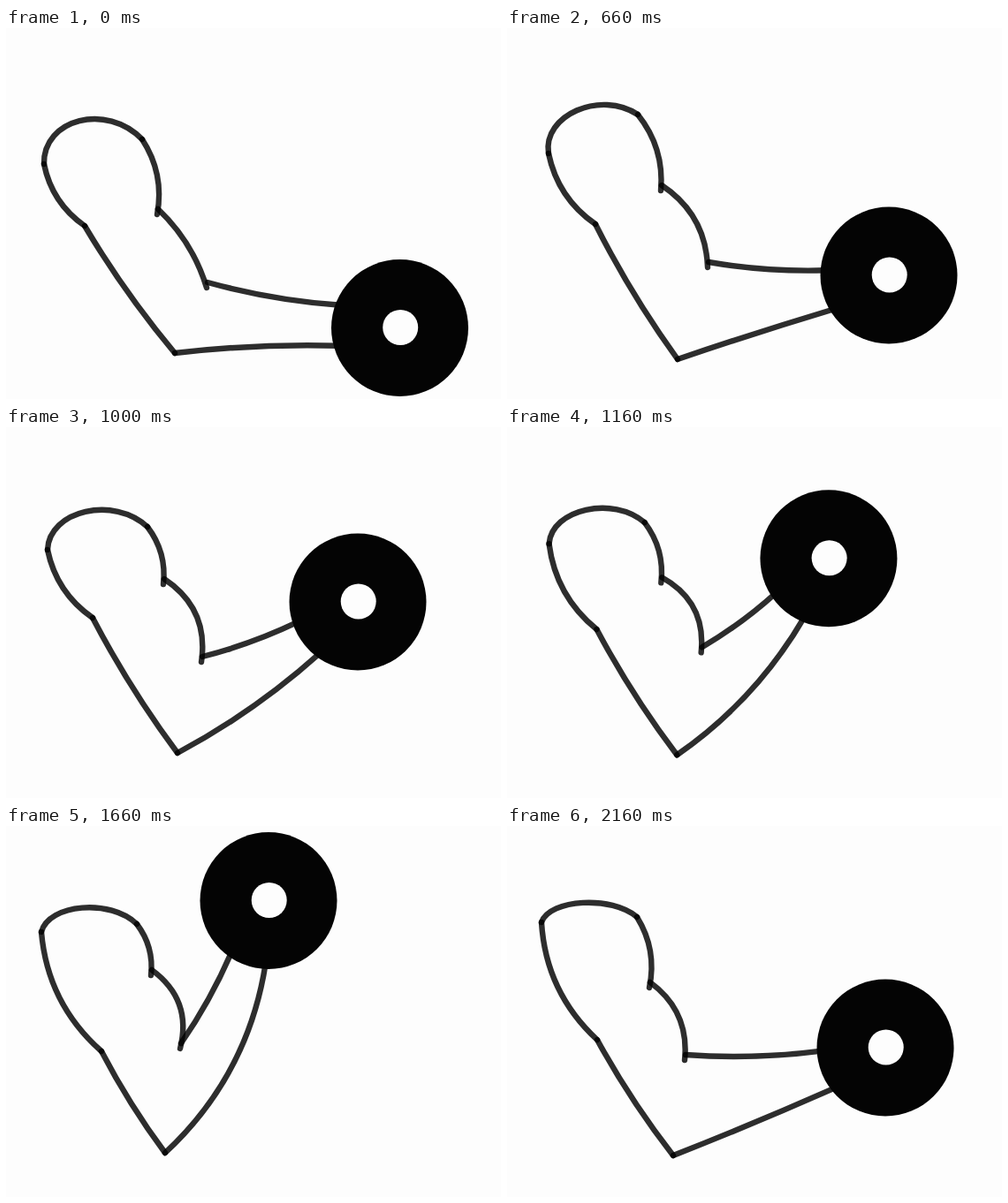
Write an HTML page that moves like this. It is 560 by 420 pixels and loops after 2.33 s.

```html
<!DOCTYPE html>
<html lang="en">
<head>
<meta charset="utf-8">
<title>Arm curl</title>
<style>
  html, body { margin: 0; width: 100%; height: 100%; overflow: hidden; background: #fdfdfd; }
  svg { display: block; width: 100%; height: 100%; }
</style>
</head>
<body>
<svg viewBox="0 0 560 420">
  <g id="arm" fill="none" stroke="#000" stroke-opacity=".82" stroke-width="6.4" stroke-linecap="round"></g>
  <g id="disc" fill="#040404">
    <circle r="77.5"/>
    <circle cx=".7" cy="-.5" r="20" fill="#fdfdfd"/>
  </g>
</svg>
<script>
const LOOP = 2330, FRAMES_PER_SECOND = 6;
const PIVOT = [193, 372], GRIP = 72;

// Joints of each key pose: shoulder, top, armpit, crook, waist, elbow, weight
const poses = [
  "43,154 154,126 172,205 228,288 89,224 191,368 445.5,339.5",
  "44,146 155,108 175,190 228,279 103,228 202,371 435.5,300",
  "47,142 148,98 175,178 228,265 100,222 193,375 432,280",
  "47,139 160,113 179,172 222,260 98,216 194,369 398,198",
  "48,122 148,100 169,168 218,234 107,250 189,375 297,91.5",
  "40,120 148,111 165,163 198,246 108,255 180,370 297,84.5",
  "39,109 147,103 162,177 202,259 102,242 188,373 428,251"
].map(text => {
  const values = text.split(/[ ,]/).map(Number);
  const [x, y] = values.splice(-2);
  // The weight is kept as angle and reach, so that it swings round the elbow
  return [...values, Math.atan2(PIVOT[1] - y, x - PIVOT[0]), Math.hypot(x - PIVOT[0], y - PIVOT[1])];
});

const arm = document.getElementById("arm");
const disc = document.getElementById("disc");
const svgPath = () => arm.appendChild(document.createElementNS("http://www.w3.org/2000/svg", "path"));
const lines = Array.from({ length: 7 }, svgPath);

// Spline through the key poses with soft tangents
function poseAt(from, t) {
  const key = i => poses[(i + poses.length) % poses.length];
  const [p, a, b, n] = [-1, 0, 1, 2].map(i => key(from + i));
  const out = t ** 3 - 2 * t * t + t, into = t ** 3 - t * t;
  return a.map((v, i) => v + (b[i] - v) * t + (out * (b[i] - p[i]) + into * (n[i] - v)) / 4);
}

// Curve from a to b, bulging to its left by a share of its length
function curve(a, b, bulge, first = 1 / 3, second = 2 / 3) {
  const dx = b[0] - a[0], dy = b[1] - a[1], h = bulge * 4 / 3;
  const control = f => [a[0] + dx * f + dy * h, a[1] + dy * f - dx * h];
  return `M${a}C${control(first)} ${control(second)} ${b}`;
}

const polar = ([x, y], angle, r) => [x + Math.cos(angle) * r, y - Math.sin(angle) * r];
const tail = ([x, y]) => [x - 1, y + 6];

function draw(k) {
  // Each move starts slowly; the final lowering takes three steps
  const share = k < 10 ? k % 2 / 2 : (k - 10) / 3;
  const v = poseAt(Math.min(5, k >> 1), share ** 1.4);
  const [shoulder, top, pit, crook, waist, elbow, [angle, reach]] =
    Array.from({ length: 7 }, (_, i) => v.slice(2 * i, 2 * i + 2));

  const weight = polar(PIVOT, angle, reach);
  const toElbow = angle + Math.PI;
  const gripTop = polar(weight, toElbow - .52 + .2 * angle, GRIP);
  const gripLow = polar(weight, toElbow + .14 + .13 * angle, GRIP);
  const roundness = .18 + .0033 * (shoulder[1] - 109);
  const flex = .17 * (1 - Math.exp(-angle / .26));
  const sag = .12 * Math.sin(angle) ** 2 - .02;

  [
    curve(shoulder, top, roundness, .1, .75),
    curve(top, tail(pit), .1),
    curve(pit, tail(crook), flex),
    curve(crook, gripTop, -.025),
    curve(shoulder, waist, -.1),
    curve(waist, elbow, -.02),
    curve(elbow, gripLow, -sag)
  ].forEach((d, i) => lines[i].setAttribute("d", d));
  disc.setAttribute("transform", `translate(${weight})`);
}

// Frame starts fall on whole hundredths of a second
const startOf = k => Math.floor(k * 100 / FRAMES_PER_SECOND) * 10;
const begin = performance.now();
let shown = -1;

function tick() {
  const time = (performance.now() - begin) % LOOP;
  let k = 0;
  while (startOf(k + 1) <= time) k++;
  if (k !== shown) draw(shown = k);
  requestAnimationFrame(tick);
}
tick();
</script>
</body>
</html>
```
